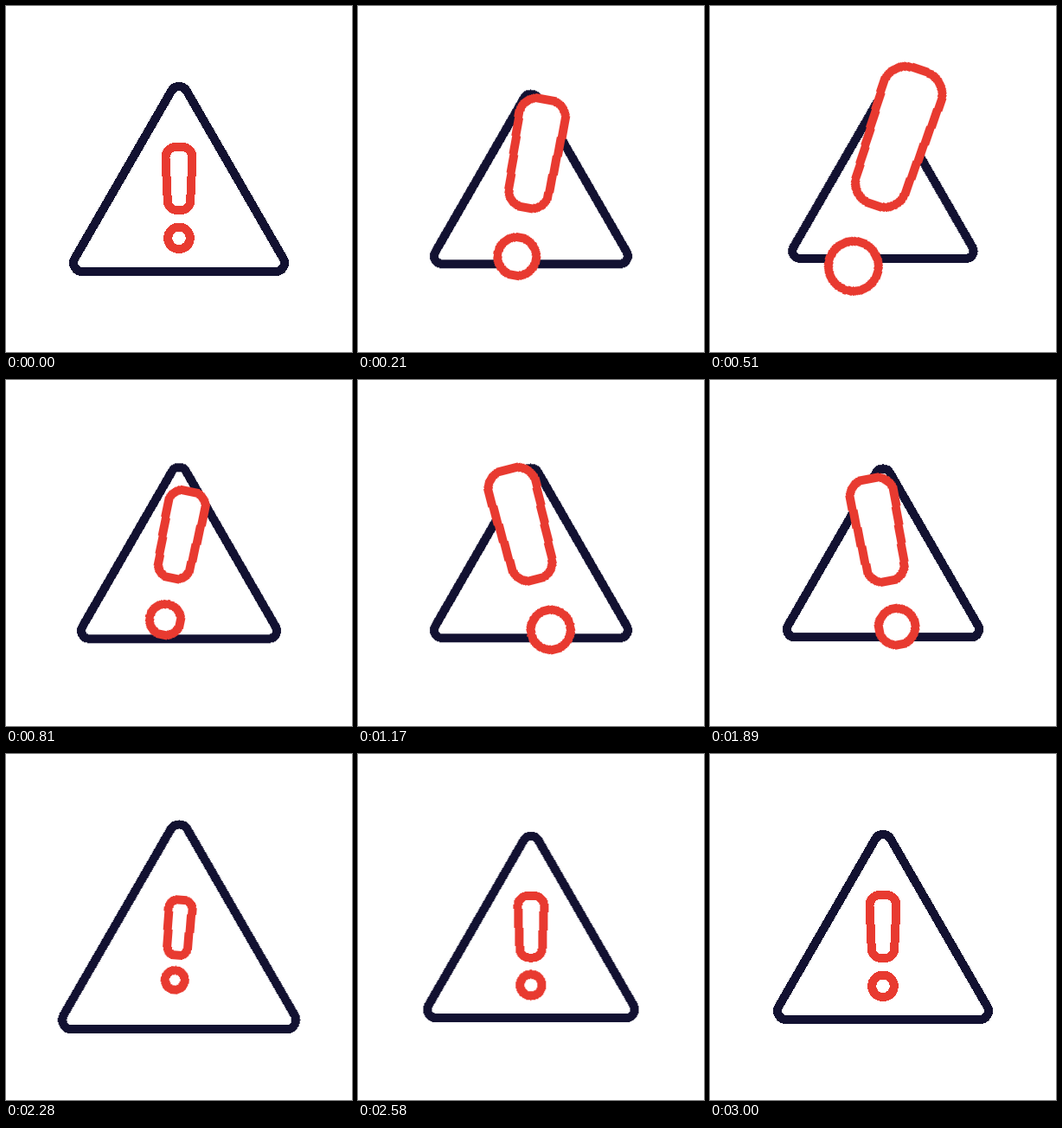
An HTML page for the animation above (5.03 s loop, 400 by 400 pixels).

```html
<!DOCTYPE html>
<html lang="en">
<head>
<meta charset="utf-8">
<title>Warning sign</title>
<style>
  html, body { margin: 0; width: 100%; height: 100%; overflow: hidden; background: #fff; }
  svg { display: block; width: 100vw; height: 100vh; }

  path, circle {
    fill: #fff;
    stroke-width: 10;
    stroke-linejoin: round;
    vector-effect: non-scaling-stroke;
    shape-rendering: crispEdges;
  }
  .sign { stroke: #121131; }
  .mark { stroke: #e83a30; }

  .sign, .swing, .lift, .nudge, .grow {
    --sine: cubic-bezier(.37, 0, .63, 1);
    --cubic: cubic-bezier(.65, 0, .35, 1);
    transform-box: view-box;
    transform-origin: 200px 200px;
    animation: 5030ms var(--sine) infinite;
  }
  .sign { animation-name: breathe; }
  .swing { animation-name: swing; animation-timing-function: var(--cubic); }
  .lift { animation-name: lift; }
  .nudge { animation-name: nudge; }
  .grow { animation-name: grow; transform-origin: 200px 235.5px; }

  @keyframes breathe {
    0% { transform: scale(1); }
    7.91% { transform: scale(.85); }
    19.3% { transform: scale(.943); }
    30.7%, 34.59% { transform: scale(.85); }
    44.14% { transform: scale(1.123); }
    49.7% { transform: scale(.98); }
    57.65%, 100% { transform: scale(1); }
  }
  @keyframes swing {
    0% { transform: rotate(0deg); }
    8.15% { transform: rotate(19deg); }
    30.02%, 32.01% { transform: rotate(-19deg); }
    44.53% { transform: rotate(4.5deg); }
    51.7%, 100% { transform: rotate(0deg); }
  }
  @keyframes lift {
    0% { transform: translateY(0); }
    7.95%, 44.53% { transform: translateY(-3px); }
    53.68%, 100% { transform: translateY(0); }
  }
  /* The bar drifts slightly away from the dot during the first swing. */
  @keyframes nudge {
    0% { transform: translate(0, 0); }
    8.15% { transform: translate(0, -2px); }
    19.3% { transform: translate(-3px, -3px); }
    30.02%, 100% { transform: translate(0, 0); }
  }
  @keyframes grow {
    0% { transform: scale(1); }
    7.95% { transform: scale(2.37); }
    18.29% { transform: scale(1.3); }
    28.63%, 31.01% { transform: scale(2.37); }
    44.53% { transform: scale(.88); }
    53.68%, 100% { transform: scale(1); }
  }
</style>
</head>
<body>
<svg viewBox="0 0 400 400">
  <path class="sign" d="M88 307H312A10 10 0 0 0 320.6 292L208.7 98A10 10 0 0 0 191.3 98L79.4 292A10 10 0 0 0 88 307z"/>
  <g class="swing mark">
    <g class="lift">
      <g class="nudge">
        <path class="grow" d="M196.5 163h7a12 12 0 0 1 12 12.5l-2.3 49.5a11 11 0 0 1-11 11h-4.4a11 11 0 0 1-11-11l-2.3-49.5a12 12 0 0 1 12-12.5z"/>
      </g>
      <circle class="grow" cx="200" cy="268.3" r="12.8"/>
    </g>
  </g>
</svg>
</body>
</html>
```
